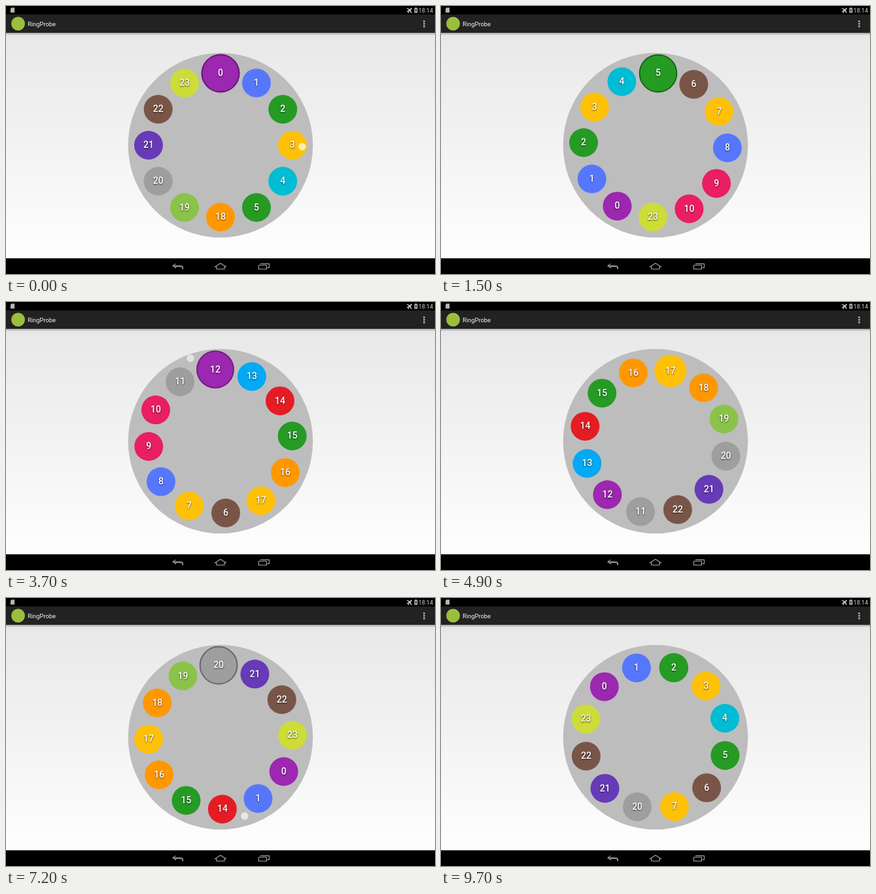
Animation of 656x410 px, one loop 9800 ms. Source, as an HTML page:

```html
<!DOCTYPE html>
<html lang="en">
<head>
<meta charset="utf-8">
<title>Number wheel</title>
<style>
  html, body { margin: 0; width: 100%; height: 100%; overflow: hidden; background: #000; }
  svg { display: block; width: 656px; height: 410px; font-family: Roboto, sans-serif; }
  .num { font-size: 14px; font-weight: 500; fill: #fff; text-anchor: middle;
         filter: drop-shadow(.7px 1px 1px rgba(0, 0, 0, .7)); }
  .nav { fill: none; stroke: #a0a0a0; stroke-width: 1.2; stroke-linejoin: round; }
</style>
</head>
<body>
<svg viewBox="0 0 656 410">
  <defs>
    <linearGradient id="page" x1="0" y1="0" x2="0" y2="1">
      <stop offset="0" stop-color="#e8e8e8"/><stop offset="1" stop-color="#fefefe"/>
    </linearGradient>
    <linearGradient id="shade" x1="0" y1="0" x2="0" y2="1">
      <stop offset="0" stop-opacity=".3"/><stop offset="1" stop-opacity="0"/>
    </linearGradient>
  </defs>
  <rect width="656" height="410"/>
  <rect y="41" width="656" height="345" fill="url(#page)"/>
  <rect y="41" width="656" height="4" fill="url(#shade)"/>

  <!-- status bar -->
  <path d="M8.5 2.5H13V10H7V4Z" fill="#b4b4b4"/>
  <path d="M613.5 3l4 2 2.4-2.3 1.2 1-2.3 2.5 1.7 4-.9.7-2.3-3.5-1.5 1.5.2 1.5-.7.5-1-1.8-1.8-1 .6-.7 1.5.2 1.4-1.6-3.3-2.2Z" fill="#ccc"/>
  <path d="M625.8 2.2h2v1h1.5V10.5h-5V3.2h1.5Z" fill="#aaa"/>
  <path d="M625.7 5.2h2.2v3h-2.2Z" fill="#444"/>
  <text x="653" y="10" text-anchor="end" font-size="9" fill="#d0d0d0">18:14</text>

  <!-- action bar -->
  <rect y="13" width="656" height="28" fill="#222"/>
  <circle cx="18.5" cy="27" r="10.5" fill="#9bbf3b"/>
  <text x="33" y="30.7" font-size="9.4" fill="#f4f4f4">RingProbe</text>
  <path d="M638 22.2h2.8v2.6H638zM638 26h2.8v2.6H638zM638 29.8h2.8v2.6H638z" fill="#a8a8a8"/>

  <!-- navigation bar -->
  <g class="nav">
    <path d="M259.5 394.5l-4.5 3 4.5 3v-2H267q3 0 3 3v1"/>
    <path d="M255 397.5H267q3.5 0 3.5 3.5v1.500"/>
    <path d="M328 393.5l-8.500 5.500h2.500v3.500h12v-3.500h2.500Z"/>
    <path d="M386.500 396.500h12v6h-12ZM389 394.300h13.500v6h-3"/>
  </g>

  <circle cx="328" cy="213" r="141.3" fill="#bdbdbd"/>
  <g id="wheel"></g>
  <circle id="touch" r="5.5" fill="#fff" stroke="#fff" stroke-opacity=".4"/>
</svg>
<script>
const CX = 328, CY = 213, RING = 110, STEP = 30, LOOP = 9800, TICK = 100;

const C = {
  purple: '#9c27b0', blue: '#5677fc', green: '#259b24', amber: '#ffc107',
  cyan: '#00bcd4', brown: '#795548', pink: '#e91e63', grey: '#9e9e9e',
  sky: '#03a9f4', red: '#e51c23', orange: '#ff9800', lime: '#8bc34a',
  violet: '#673ab7', lemon: '#cddc39'
};
const order = ('purple blue green amber cyan green brown amber blue pink pink grey ' +
  'purple sky red green orange amber orange lime grey violet brown lemon').split(' ');

// time, wheel position in items
const path = [[0, 0], [1500, 4.93], [2800, 8.79], [4900, 16.6],
  [6200, 20.157], [7200, 20.05], [9700, 25.51]];

// start, end, finger angle at start, radius at start and end, opacity
const drags = [
  [0, 1300, 91, 125, 130, .7],
  [1600, 2800, 52.8, 130, 133, .6],
  [3000, 3800, 60, 135, 135, .6],
  [4000, 4700, 60, 135, 135, .6],
  [4900, 4900, 133.3, 185, 185, .15],
  [5200, 6000, 75, 130, 135, .6],
  [6200, 7100, 153, 118, 124, .65],
  [7200, 7900, 163, 126, 146, .65],
  [8200, 9000, 95, 146, 138, .6]
];

const slopes = path.slice(1).map(([t, v], i) => (v - path[i][1]) / (t - path[i][0]));
const tangents = path.map((_, i) => {
  if (i === 0) return 0;
  const a = slopes[i - 1], b = slopes[i];
  if (b === undefined) return a;
  return a * b > 0 ? 2 * a * b / (a + b) : 0;
});

function position(t) {
  let i = 0;
  while (i < path.length - 2 && t > path[i + 1][0]) i++;
  const [t0, a] = path[i], [t1, b] = path[i + 1];
  const h = t1 - t0, u = (t - t0) / h, w = 1 - u;
  return a * w * w * (1 + 2 * u) + b * u * u * (3 - 2 * u)
    + h * u * w * (tangents[i] * w - tangents[i + 1] * u);
}

function polar(angle, r) {
  const a = angle * Math.PI / 180;
  return [CX + r * Math.sin(a), CY - r * Math.cos(a)];
}

function add(parent, tag, attrs) {
  const el = document.createElementNS('http://www.w3.org/2000/svg', tag);
  for (const k in attrs) el.setAttribute(k, attrs[k]);
  return parent.appendChild(el);
}

const place = (el, [x, y]) =>
  el.setAttribute('transform', `translate(${x.toFixed(2)} ${y.toFixed(2)})`);

const wheel = document.getElementById('wheel');
const touch = document.getElementById('touch');
const items = order.map((name, i) => {
  const g = add(wheel, 'g', {});
  const disc = add(g, 'circle', { fill: C[name] });
  const rim = add(g, 'circle', { fill: 'none', stroke: '#000', 'stroke-width': 2 });
  add(g, 'text', { class: 'num', y: 4.3 }).textContent = i;
  return { g, disc, rim };
});

function drawWheel(p) {
  const top = Math.round(p);
  items.forEach(it => it.g.style.display = 'none');
  for (let k = top - 6; k < top + 6; k++) {
    const { g, disc, rim } = items[(k + 24) % 24];
    const angle = (k - p) * STEP, d = Math.abs(angle);
    const r = 22 + 7.5 * Math.max(0, 1 - (d / 15) ** 2);
    g.style.display = '';
    place(g, polar(angle, RING));
    disc.setAttribute('r', r);
    rim.setAttribute('r', r - 1);
    rim.setAttribute('stroke-opacity', .36 * Math.max(0, 1 - (d / 8) ** 2));
  }
}

function drawTouch(t, p) {
  const drag = drags.find(([a, b]) => t >= a && t <= b);
  touch.style.display = drag ? '' : 'none';
  if (!drag) return;
  const [a, b, angle, r0, r1, alpha] = drag;
  const r = r0 + (r1 - r0) * (t - a) / (b - a || 1);
  place(touch, polar(angle - (p - position(a)) * STEP, r));
  touch.setAttribute('opacity', alpha);
}

const start = performance.now();
function frame() {
  const ms = (performance.now() - start) % LOOP;
  const t = Math.floor(ms / TICK) * TICK;
  const p = position(t);
  drawWheel(p);
  drawTouch(t, p);
  requestAnimationFrame(frame);
}
frame();
</script>
</body>
</html>
```
